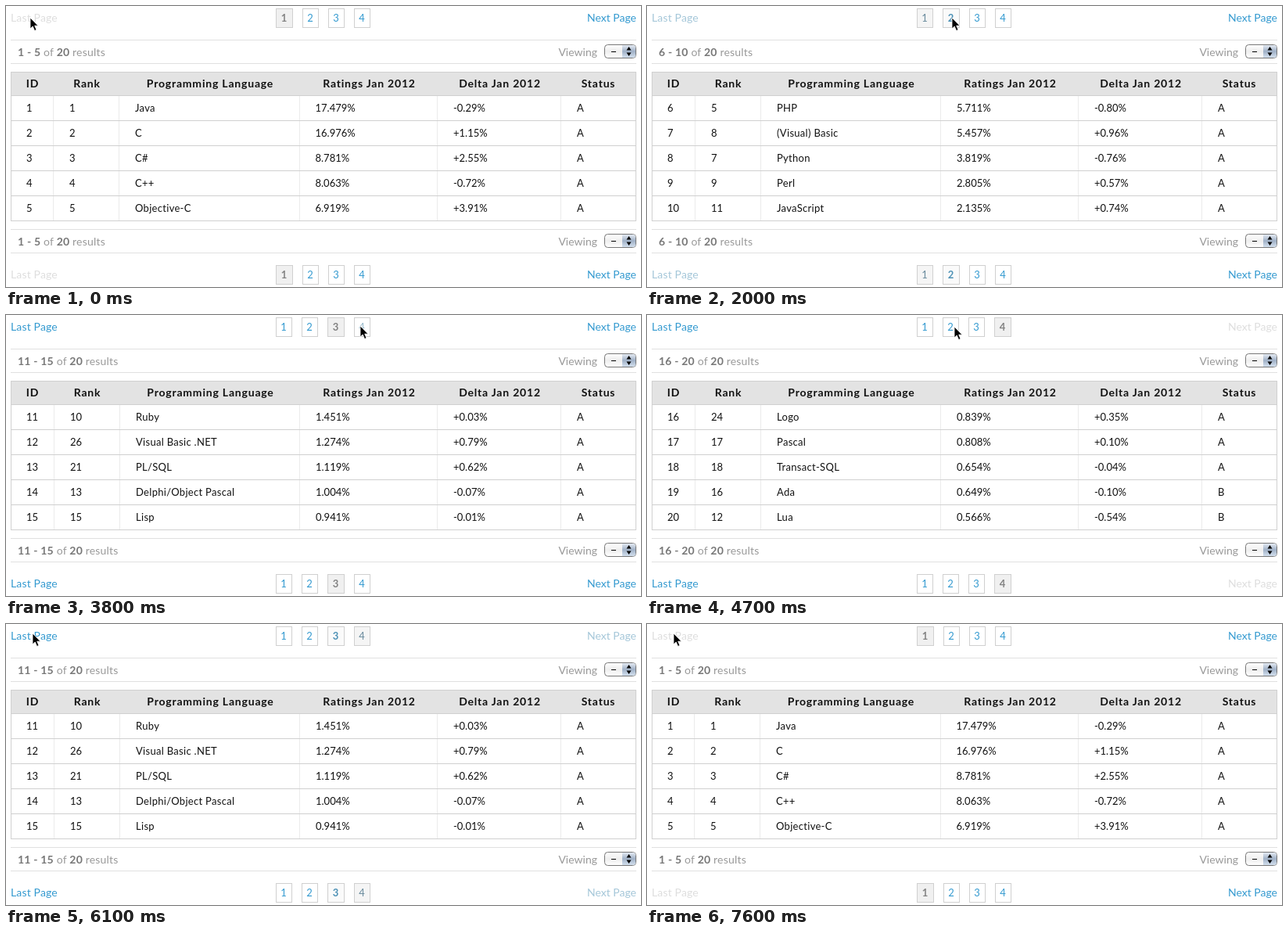
Write an HTML page that moves like this. It is 812 px wide and 359 px high and loops after 7700 ms.

```html
<!DOCTYPE html>
<html lang="en">
<head>
<meta charset="utf-8">
<title>Paginated table</title>
<style>
html, body { margin: 0; width: 100%; height: 100%; overflow: hidden; background: #fff; }
svg { display: block; width: 812px; height: 359px; font: 14px Lato, "Open Sans", sans-serif; }
.bar { fill: #999; letter-spacing: .2px; }
.bar tspan { fill: #777; font-weight: bold; }
.head { font-weight: bold; letter-spacing: .8px; text-anchor: middle; fill: #111; }
.cell { font-size: 13px; fill: #111; }
.name { letter-spacing: .3px; }
.num { font-size: 13px; text-anchor: middle; }
</style>
</head>
<body>
<svg viewBox="0 0 812 359">
  <defs>
    <linearGradient id="pale" x2="0" y2="1">
      <stop stop-color="#fff"/><stop offset=".5" stop-color="#eee"/><stop offset="1" stop-color="#fff"/>
    </linearGradient>
    <linearGradient id="blue" x2="0" y2="1">
      <stop stop-color="#e4eaf2"/><stop offset=".5" stop-color="#9fb0c6"/><stop offset="1" stop-color="#d3e0ee"/>
    </linearGradient>
  </defs>
  <g id="page"></g>
  <path id="cursor" d="M0 0V14L3.2 11L5.6 16.5L8 15.4L5.7 10.2H10Z" stroke="#fff" stroke-width=".8"/>
</svg>
<script>
const LOOP = 7700, STEP = 100, FADE = 300;
const LINK = [52, 154, 208], DIM = [222, 222, 222], HOVER = [200, 200, 200];
const ACTIVE = [130, 130, 130], WHITE = [255, 255, 255], SHADE = [240, 240, 240];

const heads = ['ID', 'Rank', 'Programming Language', 'Ratings Jan 2012', 'Delta Jan 2012', 'Status'];
const headX = [34, 103.5, 261, 464.5, 631.5, 757.5];
const cellX = [26, 81, 165, 395.5, 572, 730];
const ruleX = [60, 144, 375, 551, 709];

// rank, language, rating, delta
const rows = `1|Java|17.479|-0.29
2|C|16.976|+1.15
3|C#|8.781|+2.55
4|C++|8.063|-0.72
5|Objective-C|6.919|+3.91
5|PHP|5.711|-0.80
8|(Visual) Basic|5.457|+0.96
7|Python|3.819|-0.76
9|Perl|2.805|+0.57
11|JavaScript|2.135|+0.74
10|Ruby|1.451|+0.03
26|Visual Basic .NET|1.274|+0.79
21|PL/SQL|1.119|+0.62
13|Delphi/Object Pascal|1.004|-0.07
15|Lisp|0.941|-0.01
24|Logo|0.839|+0.35
17|Pascal|0.808|+0.10
18|Transact-SQL|0.654|-0.04
16|Ada|0.649|-0.10
12|Lua|0.566|-0.54`.split('\n').map((line, i) => {
  const [rank, name, rating, delta] = line.split('|');
  return [i + 1, rank, name, rating + '%', delta + '%', i < 18 ? 'A' : 'B'];
});

// [time, page shown from then on]
const clicks = [[-FADE, 1], [2000, 2], [2900, 3], [3900, 4], [6100, 3], [6400, 2], [7100, 1]];
// [from, to, page number under the pointer; 0 is the Last Page link]
const hovers = [[1800, 2000, 2], [2600, 2900, 3], [3700, 3900, 4], [5700, 6100, 0]];
// [start, end, x, y]
const moves = [[0, 0, 31, 15], [0, 200, 49, 15], [300, 500, 222, 17], [600, 800, 305, 18],
  [800, 1000, 350, 19], [1100, 1300, 368, 18], [1400, 1500, 381, 16], [1600, 1700, 390, 15],
  [2300, 2600, 424, 14], [3200, 3400, 440, 14], [3600, 3700, 453, 14], [4600, 5100, 151, 17],
  [5200, 5400, 50, 15], [5500, 5600, 36, 12], [5600, 5800, 34, 12]];

const clamp = v => Math.max(0, Math.min(1, v));
const mix = (a, b, k) => a.map((v, i) => v + (b[i] - v) * k);
const rgb = c => `rgb(${c.map(Math.round)})`;
const fadeAt = (t, start) => clamp((t - start + STEP) / FADE);
const rect = (x, y, w, h, attrs) => `<rect x="${x}" y="${y}" width="${w}" height="${h}" ${attrs}/>`;
const text = (x, y, s, attrs) => `<text x="${x}" y="${y}" ${attrs}>${s}</text>`;
const line = (d, color) => `<path d="${d}" stroke="${color}" fill="none"/>`;

function pager(y, page, prev, k, hover, hk) {
  const linkColor = end => mix(prev === end ? DIM : LINK, page === end ? DIM : LINK, k);
  let last = linkColor(1), x = 345;
  if (hover === 0) last = mix(last, HOVER, hk);
  let out = text(6, y + 17, 'Last Page', `fill="${rgb(last)}" letter-spacing=".15"`) +
    text(806, y + 17, 'Next Page', `fill="${rgb(linkColor(4))}" text-anchor="end"`);
  for (let n = 1; n <= 4; n++) {
    const on = n === page, w = on ? 21.5 : 20.5;
    const level = on ? k : n === prev ? 1 - k : 0;
    let ink = mix(LINK, ACTIVE, level);
    if (hover === n) ink = mix(ink, HOVER, hk);
    const left = Math.round(x), right = Math.round(x + w) - 1;
    out += rect(left + .5, y + .5, right - left, 24, `fill="${rgb(mix(WHITE, SHADE, level))}" stroke="#d0d0d0"`) +
      text((left + right + 1) / 2 - .5, y + 17, n, `class="num" fill="${rgb(ink)}"${on ? ' font-weight="bold"' : ''}`);
    x += w + 12.6;
  }
  return out;
}

function bar(y, page) {
  const range = `${page * 5 - 4} - ${page * 5}`;
  return line(`M6 ${y + .5}H806M6 ${y + 30.5}H806`, '#e0e0e0') +
    text(15, y + 21, `<tspan>${range}</tspan> of <tspan>20</tspan> results`, 'class="bar"') +
    text(756, y + 21, 'Viewing', 'fill="#999" text-anchor="end"') +
    rect(765.5, y + 6.5, 40, 17, 'rx="4" fill="url(#pale)" stroke="#777"') +
    `<path d="M788 ${y + 7}H802Q805 ${y + 7} 805 ${y + 10}V${y + 20}Q805 ${y + 23} 802 ${y + 23}H788Z" fill="url(#blue)"/>` +
    `<path d="M793.5 ${y + 13.5}L796.5 ${y + 9}L799.5 ${y + 13.5}ZM793.5 ${y + 16.5}L796.5 ${y + 21}L799.5 ${y + 16.5}ZM774 ${y + 15}h6v1h-6z"/>`;
}

function table(page) {
  const shift = i => page > 1 && i < 2 ? 1 : 0;
  let out = rect(6, 84, 800, 30, 'fill="#e3e3e3"');
  ruleX.forEach((x, i) => out += line(`M${x + shift(i) + .5} 115V274`, '#ebebeb'));
  for (let y = 114.5; y < 275; y += 32) out += line(`M6 ${y}H806`, '#d0d0d0');
  out += rect(6.5, 84.5, 799, 190, 'fill="none" stroke="#d0d0d0"');
  heads.forEach((s, i) => out += text(headX[i] + (i ? shift(i - 1) / 2 : 0), 104, s, 'class="head"'));
  rows.slice(page * 5 - 5, page * 5).forEach((row, r) => row.forEach((s, i) => {
    const dx = i === 1 || i === 2 ? shift(0) : i === 3 ? shift(0) / 2 : 0;
    out += text(cellX[i] + dx, 135 + 32 * r, s, `class="cell${i === 2 ? ' name' : ''}"`);
  }));
  return out;
}

function pointer(t) {
  let pos = moves[0].slice(2);
  for (const [start, end, x, y] of moves.slice(1)) {
    if (t <= start) break;
    pos = mix(pos, [x, y], clamp((t - start) / (end - start)));
  }
  return pos.map(Math.round);
}

function draw(t) {
  const i = clicks.findLastIndex(c => c[0] <= t);
  const [start, page] = clicks[i], prev = clicks[Math.max(0, i - 1)][1];
  const [from, , hover] = hovers.find(h => t >= h[0] && t < h[1]) || [0, 0, -1];
  const state = [page, prev, fadeAt(t, start), hover, fadeAt(t, from)];
  const below = [...state];
  below[3] = -1;
  document.getElementById('page').innerHTML =
    pager(3, ...state) + bar(43, page) + table(page) + bar(285, page) + pager(331, ...below);
  document.getElementById('cursor').setAttribute('transform', `translate(${pointer(t)})`);
}

let shown = -1;
function tick() {
  const t = Math.floor(performance.now() % LOOP / STEP) * STEP;
  if (t !== shown) draw(shown = t);
  requestAnimationFrame(tick);
}
tick();
</script>
</body>
</html>
```
